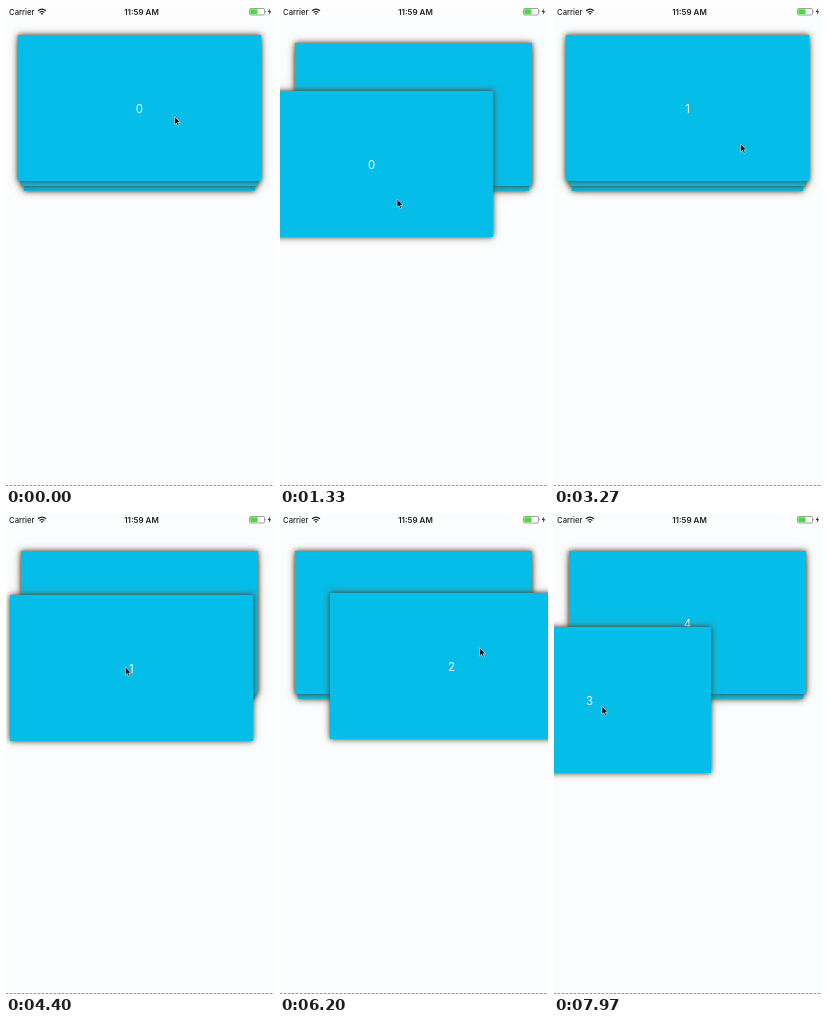
Write an HTML page that moves like this. It is 268 by 480 pixels and loops after 8 s.

```html
<!DOCTYPE html>
<html lang="en">
<head>
<meta charset="utf-8">
<title>Card stack</title>
<style>
  html, body { margin: 0; width: 100%; height: 100%; overflow: hidden; background: #fcfdff; }
  #stage { position: relative; width: 268px; height: 480px; overflow: hidden; font-family: Inter, Roboto, sans-serif; }
  #stage::after { content: ""; position: absolute; left: 0; right: 0; bottom: 0; height: 1px;
    background: repeating-linear-gradient(90deg, #999 0 2px, #ddd 2px 4px); }
  .card { position: absolute; box-sizing: border-box; padding-top: 2px; background: #04bde8;
    color: #f4fcf4; font-size: 11.5px; display: flex; align-items: center; justify-content: center;
    box-shadow: 0 0 5px rgba(45, 42, 32, .85), 0 0 9px rgba(150, 135, 90, .5); }
  svg { position: absolute; left: 0; top: 0; }
  #bar { z-index: 5; }
  #cursor { z-index: 6; overflow: visible; }
</style>
</head>
<body>
<div id="stage">
  <svg id="bar" width="268" height="16" fill="#222">
    <text x="3" y="8.6" font-size="7.7" font-weight="500">Carrier</text>
    <path d="M32 4.8Q36 1.4 40 4.8M33.6 6.5Q36 4.5 38.4 6.5" fill="none" stroke="#222" stroke-width="1.2"/>
    <path d="M34.7 7.6Q36 6.5 37.3 7.6L36 9Z"/>
    <text x="135.5" y="8.6" font-size="8" font-weight="600" text-anchor="middle">11:59 AM</text>
    <rect x="243.5" y="2.5" width="15" height="6.5" rx="1.3" fill="#fff" stroke="#777" stroke-width=".7"/>
    <rect x="244.3" y="3.3" width="7.2" height="4.9" fill="#4cd93f"/>
    <path d="M259.4 4.6q1.3 1.1 0 2.2z" fill="#777"/>
    <path d="M264 2.5l-2.3 3.6h1.7l-.7 3 2.5-3.8h-1.7z"/>
  </svg>
  <svg id="cursor" width="8" height="12">
    <path d="M0 0V8.2L1.9 6.5 3.2 9.6 4.6 9 3.3 6H5.8Z" fill="#080808" stroke="#e8f4ee" stroke-width=".6"/>
  </svg>
</div>
<script>
const LOOP = 8000;
const RETURN = 250;    // released card glides home
const PAUSE = 40;      // before the stack moves up
const PROMOTE = 250;   // stack moves up one place
const REST = 300;      // pointer waits after a release
const TRAVEL = 500;    // pointer moves to the next grab

// The pointer takes a card at `from`, pulls it `by` an offset and lets go.
const DRAGS = [
  { grab: 350, drop: 1640, from: [159, 137.5], by: [-49, 65], swipe: true },
  { grab: 2550, drop: 2900, from: [174, 127], by: [16, 13], swipe: false },
  { grab: 4290, drop: 4560, from: [127.5, 101], by: [-22, 141], swipe: true },
  { grab: 5980, drop: 6460, from: [161.5, 84], by: [86.5, 113], swipe: true },
  { grab: 7600, drop: LOOP, from: [146, 108], by: [-99.5, 85.5], swipe: true }
];

const stage = document.getElementById("stage");
const cursor = document.getElementById("cursor");
const cards = [0, 1, 2].map(() => {
  const card = document.createElement("div");
  card.className = "card";
  stage.append(card);
  return card;
});

const progress = (t, start, length) => Math.min(1, Math.max(0, (t - start) / length));
const easeOut = u => 1 - (1 - u) ** 3;
const easeInOut = u => u * u * (3 - 2 * u);
const spring = u => 1 - (1 - u) ** 2 * Math.cos(1.5 * Math.PI * u);
const mix = (a, b, k) => a.map((v, i) => v + (b[i] - v) * k);

const endOf = d => d.drop + RETURN + (d.swipe ? PAUSE + PROMOTE : 0);

// Deeper cards are smaller and peek out 5px below: x, y, width, height
function slot(depth) {
  const scale = 1 - 0.0235 * depth;
  const w = 243 * scale, h = 146 * scale;
  return [133.5 - w / 2, 175 + 5 * depth - h, w, h];
}

function pull(drag, t) {
  const k = easeInOut(progress(t, drag.grab, drag.drop - drag.grab));
  return drag.by.map(v => v * k);
}

function pointerAt(t) {
  const next = DRAGS.findIndex(d => t < d.grab);
  const last = DRAGS[(next < 0 ? DRAGS.length : next) - 1];
  if (!last) return mix([168.5, 110.5], DRAGS[0].from, easeInOut(t / DRAGS[0].grab));
  const [dx, dy] = pull(last, t);
  const here = [last.from[0] + dx, last.from[1] + dy];
  if (next < 0) return here;
  return mix(here, DRAGS[next].from, easeInOut(progress(t, last.drop + REST, TRAVEL)));
}

function place(card, [x, y, w, h], z, label) {
  Object.assign(card.style, {
    left: x + "px", top: y + "px", width: w + "px", height: h + "px", zIndex: z
  });
  card.textContent = label;
}

function draw(t) {
  const [px, py] = pointerAt(t);
  cursor.style.transform = `translate(${px}px, ${py}px)`;

  const front = DRAGS.filter(d => d.swipe && endOf(d) <= t).length;
  const drag = DRAGS.find(d => d.grab <= t && t < endOf(d));
  const home = slot(0);
  let rect = home, behind = false, rise = 0;

  if (drag) {
    const [dx, dy] = pull(drag, t);
    const [x, y, w, h] = home;
    const back = progress(t, drag.drop, RETURN);
    behind = drag.swipe && t >= drag.drop;
    rect = [x + dx, y + dy, w, h];
    if (behind) {
      // A swiped card slides under the stack, shrinking, and becomes the last one.
      rise = easeInOut(progress(t, drag.drop + RETURN + PAUSE, PROMOTE));
      rect = mix(mix(rect, [x, y, w, h * 0.9], easeOut(back)), slot(2), rise);
    } else {
      rect = mix(rect, home, spring(back));
    }
  }

  place(cards[0], rect, behind ? 0 : 3, front);
  place(cards[1], slot(1 - rise), 2, front + 1);
  place(cards[2], slot(2 - rise), 1, front + 2);
}

const start = performance.now();
function tick() {
  draw((performance.now() - start) % LOOP);
  requestAnimationFrame(tick);
}
tick();
</script>
</body>
</html>
```
